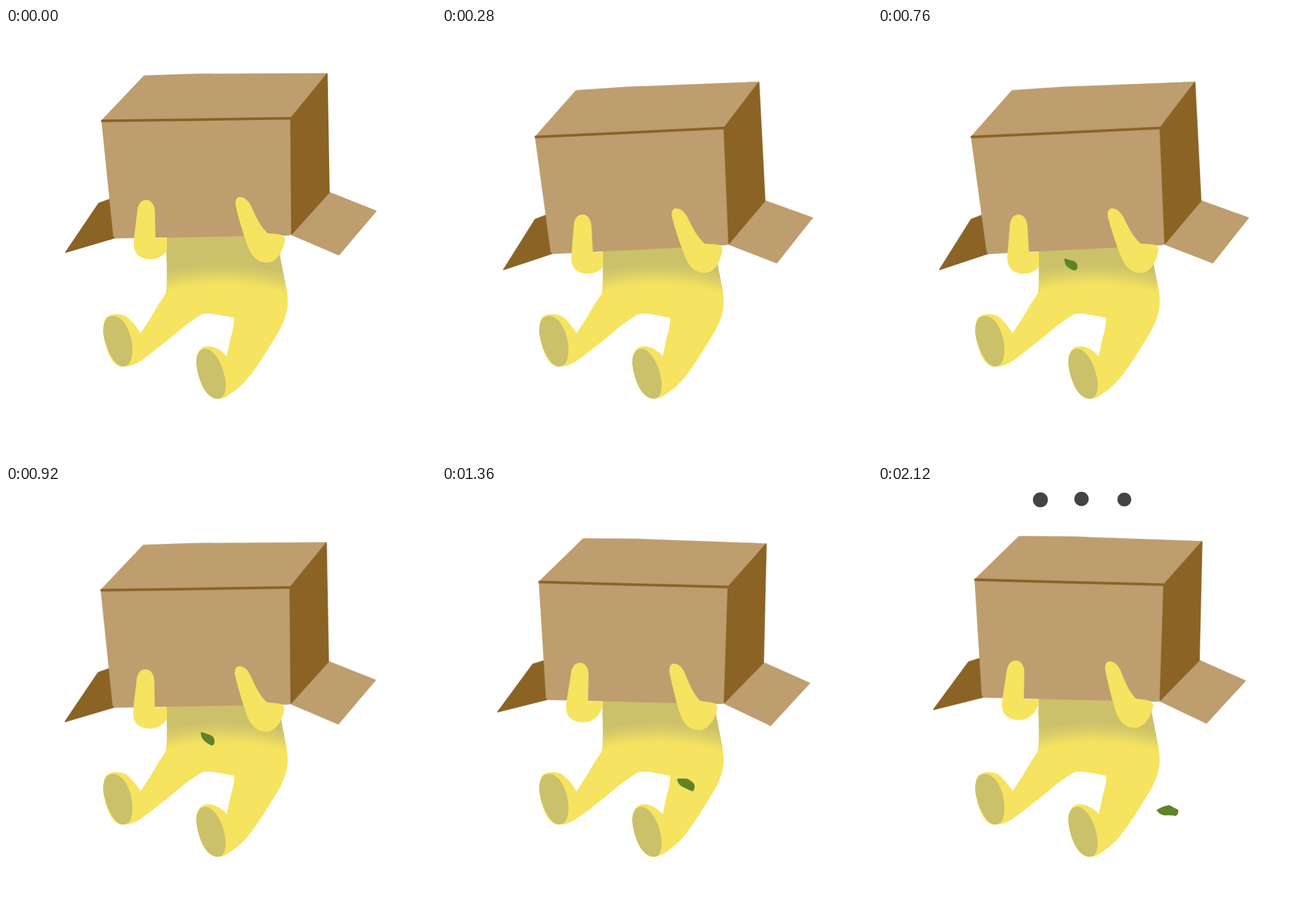
Write an HTML page without scripts that moves like this. It is 748 px wide and 748 px high and loops after 2.4 s.

```html
<!DOCTYPE html>
<html lang="en">
<head>
<meta charset="utf-8">
<title>Empty box</title>
<style>
  html, body { margin: 0; width: 100%; height: 100%; overflow: hidden; background: #fff; }
  svg { display: block; width: 100vw; height: 100vh; }

  .tan { fill: #be9d6e; stroke: #be9d6e; }
  .dark { fill: #8a6325; stroke: #8a6325; }
  .tan, .dark { stroke-width: 2; stroke-linejoin: round; }
  .edge { fill: none; stroke: #8a6325; stroke-width: 4.5; stroke-linecap: round; }
  .skin { fill: #f6e35f; }
  .sole { fill: #cbc16b; }
  .leaf { fill: #5f8428; }
  .dots { fill: #444443; }

  .shake, .leaf, .dots circle { animation: 2400ms -2ms infinite both; }
  .shake { animation-name: shake; transform-origin: 336.5px 261px; }
  .leaf { animation-name: fall; }
  .dots circle { animation-timing-function: step-end; }
  .dots :nth-child(1) { animation-name: dot1; }
  .dots :nth-child(2) { animation-name: dot2; }
  .dots :nth-child(3) { animation-name: dot3; }

  @keyframes shake {
    0% { transform: translate(0, 0) rotate(0deg); animation-timing-function: steps(6); }
    10% { transform: translate(-1.1px, 22.25px) rotate(-1.95deg); animation-timing-function: step-end; }
    11.6667% { transform: translate(-1.1px, 22.25px) rotate(-1.95deg); animation-timing-function: steps(7); }
    23.3333% { transform: translate(-3.2px, 17.75px) rotate(4.55deg); animation-timing-function: steps(5); }
    31.6667% { transform: translate(-1.1px, 22.25px) rotate(-1.95deg); animation-timing-function: steps(9); }
    46.6667% { transform: translate(-1.4px, 16.2px) rotate(2.3deg); animation-timing-function: steps(12); }
    66.6667%, 100% { transform: translate(-2.2px, 8.2px) rotate(2.3deg); }
  }

  @keyframes fall {
    0% {
      opacity: 0; transform: translate(-15px, -40px); animation-timing-function: step-end;
      d: path("M324 401Q329 402 335 404Q346 405 347 414Q348 420 342 422Q334 420 328 414Q324 408 324 401Z");
    }
    25% {
      opacity: 1; transform: translate(-15px, -40px); animation-timing-function: steps(4);
      d: path("M324 401Q329 402 335 404Q346 405 347 414Q348 420 342 422Q334 420 328 414Q324 408 324 401Z");
    }
    31.6667% {
      opacity: 1; transform: translate(0, 0); animation-timing-function: steps(11);
      d: path("M324 401Q329 402 335 404Q346 405 347 414Q348 420 342 422Q334 420 328 414Q324 408 324 401Z");
    }
    50% {
      opacity: 1; transform: translate(0, 0); animation-timing-function: steps(10);
      d: path("M365 474Q372 477 380 480Q389 484 390 490Q392 500 388 504Q380 500 371 491Q364 485 365 474Z");
    }
    66.6667% {
      opacity: 1; transform: translate(0, 0); animation-timing-function: step-end;
      d: path("M474.5 562Q484 555 497 553Q503 557 512 561Q514 568 508 572Q498 570 488 571Q479 569 474.500 562Z");
    }
    68.3333%, 100% {
      opacity: 1; transform: translate(10px, 2px);
      d: path("M474.5 562Q484 555 497 553Q503 557 512 561Q514 568 508 572Q498 570 488 571Q479 569 474.500 562Z");
    }
  }

  @keyframes dot1 { 0% { opacity: 0; } 71.6667%, 100% { opacity: 1; } }
  @keyframes dot2 { 0% { opacity: 0; } 80%, 100% { opacity: 1; } }
  @keyframes dot3 { 0% { opacity: 0; } 88.3333%, 100% { opacity: 1; } }
</style>
</head>
<body>
<svg viewBox="0 0 748 748">
  <defs>
    <radialGradient id="shade" gradientUnits="userSpaceOnUse" cx="375" cy="840" r="450">
      <stop offset=".872" stop-color="#f6e35f"/>
      <stop offset=".895" stop-color="#ebdb62"/>
      <stop offset=".92" stop-color="#dbce67"/>
      <stop offset=".955" stop-color="#cbc16b"/>
    </radialGradient>
    <clipPath id="beside"><path d="M0 0H280V748H0Z"/></clipPath>
  </defs>

  <path fill="url(#shade)" d="M280 340L279 395Q281 440 278 462Q264 481 253 502L234 531
    Q221 510 208 501Q190 494 176 502Q169 508 169 528C173 560 184 589 203 589Q220 589 234 579
    Q274 550 310 519Q329 505 341 498Q352 495 370 499L397 504Q397 520 391 538L384 571
    Q373 558 357 554Q344 552 337 560Q330 569 331 583C336 620 350 645 368 645Q380 645 389 637
    Q408 625 421 609C441 584 459 553 475 527Q490 500 490 477Q490 462 486 444L476 393L472 340Z"/>
  <path class="sole" d="M169 528Q169 501 186 501C204 499 221 533 220 562Q219 589 203 589C187 588 171 552 169 528Z"/>
  <path class="sole" d="M331 583Q331 560 346 558C365 557 382 596 382 621Q382 645 368 645C347 645 333 610 331 583Z"/>

  <path class="leaf" d="M324 401Q329 402 335 404Q346 405 347 414Q348 420 342 422Q334 420 328 414Q324 408 324 401Z"/>

  <g class="shake">
    <path class="dark" d="M184 297L161.500 305L104 390L189 365Z"/>
    <path class="tan" d="M563 286.500L643.500 318.500L579 394.500L496 359Z"/>
    <path class="tan" d="M167 161L240.500 83.500L330 80.500L558.500 79.500L494.500 158Z"/>
    <path class="tan" d="M167 162L494.500 158L496 359L490 360L191 365L187.500 362Z"/>
    <path class="dark" d="M495.500 157L558.500 80L562 286L497 358Z"/>
    <path class="edge" d="M167.500 161.500L330 159.500L494.500 157"/>
  </g>

  <g clip-path="url(#beside)">
    <path class="skin shake" d="M229 313Q233 299 244 299Q257 300 259 318L260 366L290 364L285 376
      Q276 402.500 250 402.500Q222 401 222 374Q225 345 229 313Z"/>
  </g>
  <path class="skin shake" d="M399 307Q399 294 407 294Q418 294 426 309C435 329 441 343 455 357
    Q470 358 480 360Q487 364 485 372Q475 408 453 408Q429 407 419 376Q407 342 399 307Z"/>

  <g class="dots">
    <circle cx="282.500" cy="24" r="13"/>
    <circle cx="354" cy="22.500" r="12.500"/>
    <circle cx="428.500" cy="23.500" r="12"/>
  </g>
</svg>
</body>
</html>
```
